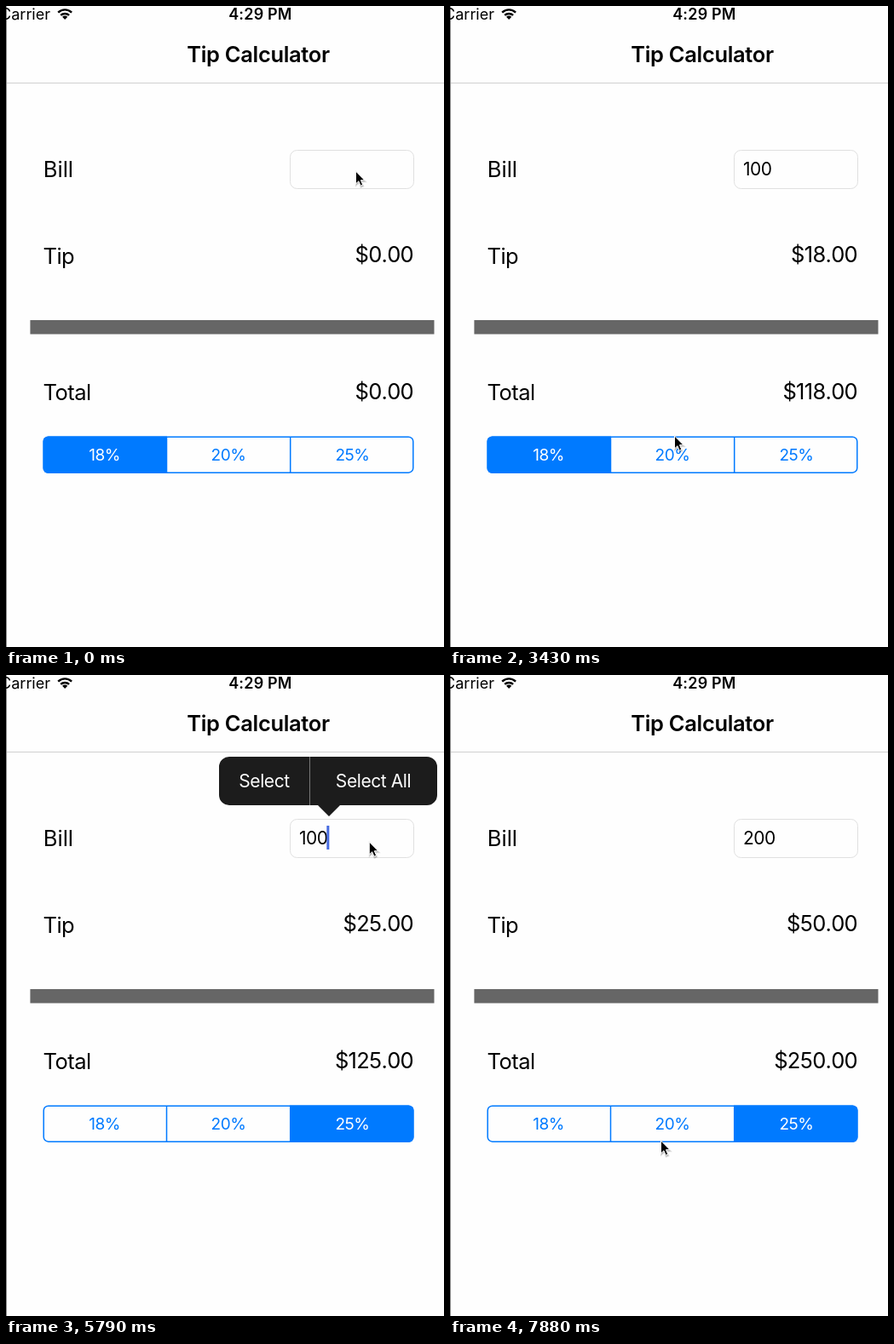
Recreate the animation shown at these times as an HTML page. Size 514 by 753 pixels, loop 8 s.

```html
<!DOCTYPE html>
<html lang="en">
<head>
<meta charset="utf-8">
<title>Tip Calculator</title>
<style>
  html, body { margin: 0; width: 100%; height: 100%; overflow: hidden; background: #fefefe; }
  svg { display: block; width: 514px; height: 753px; }
  text { font: 25.5px Inter, "Open Sans", sans-serif; letter-spacing: -.02em; }
  .end { text-anchor: end; }
  .mid { text-anchor: middle; }
  .bold { font-weight: 600; letter-spacing: -.013em; }
  .status { font-size: 18px; letter-spacing: 0; }
  .amount { letter-spacing: -.027em; font-kerning: none; }
  .field { font-size: 21px; }
  .seg { font-size: 19px; letter-spacing: -.025em; }
  .menu { font-size: 21px; fill: #fff; }
</style>
</head>
<body>
<svg viewBox="0 0 514 753">
  <defs>
    <clipPath id="round"><rect x="43.5" y="505.5" width="435" height="43.5" rx="6"/></clipPath>
    <path id="arrow" d="M0 0V15L3.4 11.8L5.7 17.2L8.3 16.1L6 10.7H10.5z"/>
  </defs>
  <path d="M.5 0V753" stroke="#909090"/>
  <path d="M1 90.5H514" stroke="#cfcfcf"/>

  <text class="status end" x="52" y="16">Carrier</text>
  <g fill="none" stroke="#000" stroke-width="2.4">
    <path d="M61.2 7.6a11.4 11.4 0 0 1 15.9 0M64.2 10.9a7.2 7.2 0 0 1 9.9 0"/>
    <path d="M69.15 16l-3.1-3.2a4.4 4.4 0 0 1 6.2 0z" fill="#000" stroke="none"/>
  </g>
  <text class="status bold mid" x="298.4" y="16" style="letter-spacing:.01em">4:29 PM</text>
  <text class="bold mid" x="296" y="66">Tip Calculator</text>

  <text x="43.8" y="200.5" style="letter-spacing:0">Bill</text>
  <text x="43.5" y="302.5">Tip</text>
  <text x="43.5" y="463">Total</text>
  <text class="amount end" id="tip" x="478" y="301"></text>
  <text class="amount end" id="total" x="478" y="461.5"></text>
  <path d="M28.4 369H502.5V385.5H28.4z" fill="#666"/>

  <rect x="333.5" y="169.5" width="145" height="45" rx="8" fill="none" stroke="#e0e0e0"/>
  <text class="amount field" id="bill" x="344" y="199"></text>
  <rect id="caret" y="177" width="3" height="28" fill="#476be0"/>

  <g id="segments" clip-path="url(#round)"></g>
  <g fill="none" stroke="#007aff" stroke-width="1.5">
    <rect x="44.2" y="506.2" width="433.6" height="42" rx="5.5"/>
    <path d="M188.5 506V549M333.7 506V549"/>
  </g>

  <g id="menu">
    <path d="M262 96H494a12 12 0 0 1 12 12V141a12 12 0 0 1-12 12H392L379 166L366 153H262a12 12 0 0 1-12-12V108a12 12 0 0 1 12-12z" fill="#1c1c1c"/>
    <path d="M356.5 96V153" stroke="#777"/>
    <text class="menu mid" x="303" y="132">Select</text>
    <text class="menu mid" x="431" y="132">Select All</text>
  </g>

  <g id="cursor">
    <use href="#arrow" x=".5" y="1.5" fill="#0003" stroke="#0002" stroke-width="2"/>
    <use href="#arrow" stroke="#fff"/>
  </g>
</svg>
<script>
const LOOP = 8000;
const STEP = 148.4; // the screen refreshes once per step; times below are in steps
const BLINK = 1000 / STEP;
const rates = [18, 20, 25];
const picks = [25.3, 31.27];
const $ = id => document.getElementById(id);
const clamp = v => Math.max(0, Math.min(1, v));

$('segments').innerHTML = rates.map((rate, i) =>
  `<rect x="${43 + 145 * i}" y="505" width="146" height="44" fill="#007aff"/>
   <text class="seg mid" x="${115.5 + 145.5 * i}" y="534">${rate}%</text>`).join('');
const fills = document.querySelectorAll('#segments rect');
const labels = document.querySelectorAll('#segments text');

// Pointer strokes from the field to the segments and back
const home = {x: 410.4, y: 194};
const strokes = [
  {from: 14, to: 23, x: 263.5, y: 505},
  {from: 23, to: 24, x: 263.5, y: 522},
  {from: 28, to: 31, x: 429, y: 532},
  {from: 31, to: 33, x: 411.5, y: 432},
  {from: 33, to: 35, x: 475, y: 250},
  {from: 35, to: 37, x: 426.3, y: 196},
  {from: 49, to: 52, x: 154, y: 490},
  {from: 52, to: 53, x: 247.5, y: 547},
];

function pointer(n) {
  return strokes.reduce((p, s) => {
    const k = clamp((n - s.from) / (s.to - s.from));
    return {x: p.x + (s.x - p.x) * k, y: p.y + (s.y - p.y) * k};
  }, home);
}

// Type 100, erase it, then type 200.
function billAt(n) {
  if (n < 42) return '100'.slice(0, Math.max(0, n - 9));
  if (n < 44) return '100'.slice(0, 2 * (43 - n));
  return '200'.slice(0, Math.floor((n - 42) / 1.6));
}

// Typing keeps the caret lit; afterwards it blinks.
function caretAlpha(n) {
  const start = n < 12 ? 2 : n < 42 ? 12 : Math.min(n, 47);
  const phase = (n - start) % BLINK;
  return phase >= 0 && phase < 4 ? clamp(.5 + phase + (start > 2)) : 0;
}

function draw(time) {
  const n = Math.floor((time % LOOP + 5) / STEP);
  const bill = billAt(n);
  const rate = rates[picks.filter(p => p <= n).length];
  const tip = bill * rate / 100;
  $('bill').textContent = bill;
  $('tip').textContent = '$' + tip.toFixed(2);
  $('total').textContent = '$' + (+bill + tip).toFixed(2);

  $('caret').setAttribute('x', 343.5 + (bill ? $('bill').getComputedTextLength() - .5 : 0));
  $('caret').setAttribute('opacity', caretAlpha(n));

  const [a, b] = picks.map(p => clamp((n - p) / 2));
  [1 - a, a - b, b].forEach((k, i) => {
    fills[i].setAttribute('opacity', k);
    labels[i].setAttribute('fill', `rgb(${255 * k},${122 + 133 * k},255)`);
  });

  $('menu').setAttribute('opacity', n === 39 || n === 40 ? 1 : 0);
  const {x, y} = pointer(n);
  $('cursor').setAttribute('transform', `translate(${x},${y})`);
}

const began = performance.now();
function frame() {
  draw(performance.now() - began);
  requestAnimationFrame(frame);
}
frame();
</script>
</body>
</html>
```
